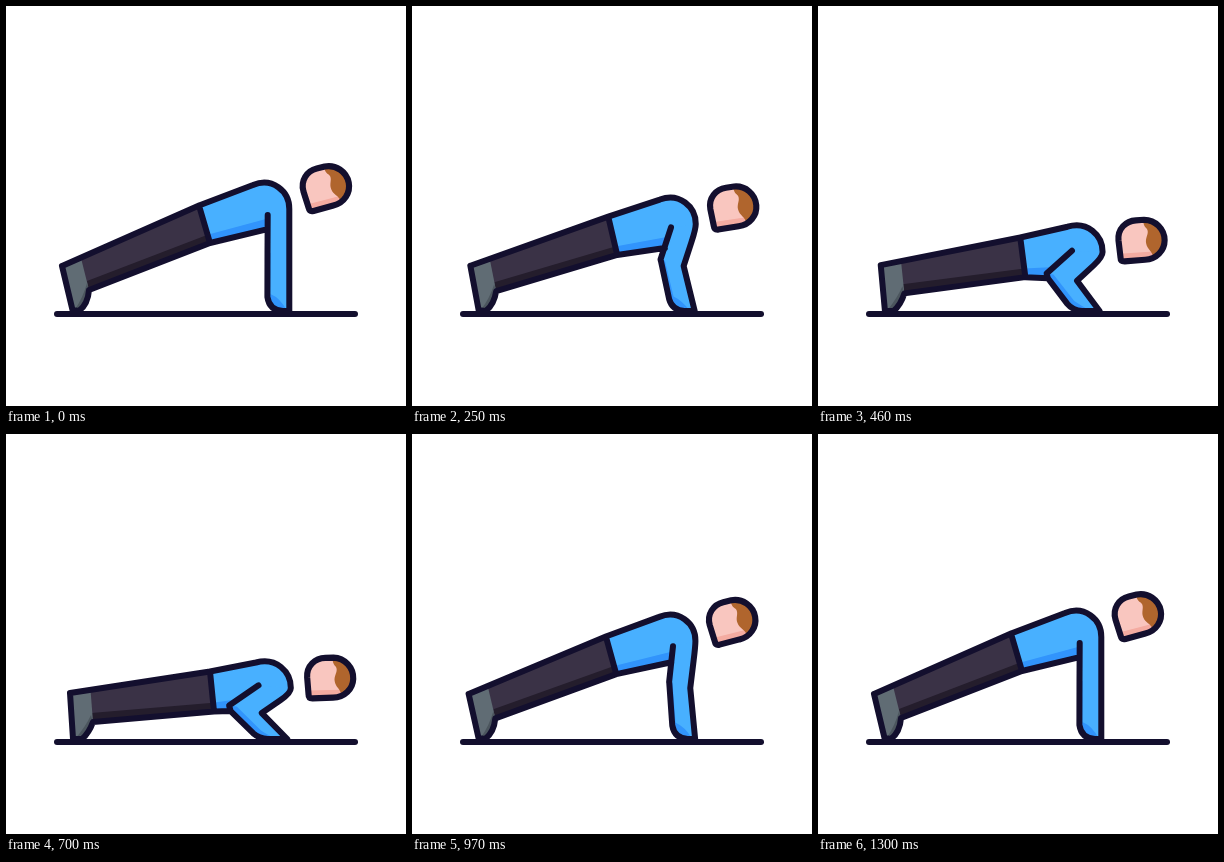
Animation, 400 px wide and 400 px high, one loop 1.36 s. Source, as an HTML page:

```html
<!DOCTYPE html>
<html lang="en">
<head>
<meta charset="utf-8">
<title>Push-up</title>
<style>
  html, body { margin: 0; width: 100%; height: 100%; overflow: hidden; background: #fff; }
  svg { display: block; width: 100vw; height: 100vh; }
  .line { fill: none; stroke: #130f2e; stroke-width: 6; stroke-linecap: round; stroke-linejoin: round; }
</style>
</head>
<body>
<svg viewBox="0 0 400 400">
  <path id="pants" fill="#3a3246"/>
  <path id="pantsShade" fill="#241d2c"/>
  <path id="shoe" fill="#606c74"/>
  <path id="shoeShade" fill="#4c565e"/>
  <path id="torso" fill="#48b0ff"/>
  <path id="torsoShade" fill="#3194fc"/>
  <path id="arm" fill="#48b0ff"/>
  <path id="armShade" fill="#3194fc"/>
  <path id="outline" class="line"/>
  <path class="line" d="M51 308H349"/>
  <g id="head">
    <path id="face" fill="#f9c6bf"/>
    <path fill="#f4aba1" d="M-21 13L12 11L13 17L4 19L-16 20.5L-20 19Z"/>
    <path fill="#b0652d" d="M2 -20C14 -20 23 -11 23 0C23 9 18 15 12 16.5C11 10 6 9 5 3C4 -2 7 -5 6.5 -9C6 -13 2.5 -11 2 -20Z"/>
    <path id="faceLine" class="line"/>
  </g>
</svg>
<script>
const LOOP = 1360, START = 100, STEP = 30;
const $ = id => document.getElementById(id);
const draw = (id, d) => $(id).setAttribute("d", d);

const skull = "M-20 17L-22 0C-23 -11 -15 -19 -5 -19.5L3 -20C14 -20 23 -11 23 0" +
  "C23 10 15 18.5 4 19L-16 20.5Q-20 20.5 -20 17Z";
draw("face", skull);
draw("faceLine", skull);

// Keys: time, body drop, head height, head tilt
const keys = [
  [100, 0, 181.2, -11],
  [250, 15, 201.2, -5],
  [460, 43, 234.3, 0],
  [640, 54, 246, 1.5],
  [700, 51, 244, 2],
  [820, 34, 232, 8],
  [970, 4, 187, -10.5],
  [1080, -3, 173.5, -14],
  [1180, -1.5, 177.5, -13],
  [1300, 0, 181.2, -11]
];

// Smooth curve through the keys, level at each turning point
function slope(i, c) {
  if (i === 0 || i === keys.length - 1) return 0;
  const [p, k, n] = [keys[i - 1], keys[i], keys[i + 1]];
  const a = (k[c] - p[c]) / (k[0] - p[0]);
  const b = (n[c] - k[c]) / (n[0] - k[0]);
  return a * b <= 0 ? 0 : 2 * a * b / (a + b);
}

function track(t, c) {
  const last = keys.length - 1;
  if (t <= keys[0][0]) return keys[0][c];
  if (t >= keys[last][0]) return keys[last][c];
  let i = 0;
  while (t > keys[i + 1][0]) i++;
  const a = keys[i], b = keys[i + 1], w = b[0] - a[0];
  const s = (t - a[0]) / w, r = 1 - s;
  return a[c] * (1 + 2 * s) * r * r + b[c] * s * s * (3 - 2 * s) +
    w * s * r * (r * slope(i, c) - s * slope(i + 1, c));
}

const mix = (a, b, u) => [a[0] + (b[0] - a[0]) * u, a[1] + (b[1] - a[1]) * u];
const add = (p, x, y) => [p[0] + x, p[1] + y];

// Joins command letters and points into path data
const path = (...parts) =>
  parts.map(p => typeof p === "string" ? p : p.map(v => v.toFixed(2)).join(" ")).join(" ");

function pose(d) {
  const u = d / 51, root = Math.sqrt(Math.max(0, d));
  const at = (ax, ay, bx, by) => mix([ax, ay], [bx, by], u);

  // Legs
  const hip = at(193, 199.5, 204, 237.5), waist = at(204, 237, 208, 277.5);
  const heel = at(56, 260, 64, 259), toe = at(66.5, 304, 67, 305);
  const sole = at(73, 305, 76, 305), ankle = at(83, 284, 87, 288);
  const bend = at(82, 298, 83, 299), cuff = at(75, 252, 84.5, 256);

  // Shoulder and arm
  const back = at(247, 179, 250, 228.5);
  const c1 = at(266, 171, 270, 223), c2 = at(283.5, 185, 285, 237.5);
  const side = 283.3 + .03 * d;
  const front = [side, 203 + d], corner = [side, 208 + d];
  const inner = [283.3 - .26 * d - 2 * root, 252 + .53 * d];
  const outer = [261.5 - .62 * d - .95 * root, 246 + .5 * d];
  const elbow = add(outer, .03 * d, .11 * d);
  const pit = [261.7 - .18 * d, 209 + .83 * d];
  const wrist = [261.4 - .28 * d, 291 + .16 * d];
  const palm = [277 - .3 * d, 305], hand = [283.3 - .04 * d, 305];
  const curl = [wrist[0] + 2 + .08 * d, 304.5];
  const under = mix(pit, elbow, Math.min(1, .38 + .0155 * d));

  const shoe = ["M", heel, "L", toe, "L", sole, "Q", bend, ankle];
  const shoulder = ["M", hip, "L", back, "C", c1, c2, front];
  const limb = ["Q", corner, upperEnd(corner, inner), "L", inner, "L", hand, "L", palm,
    "Q", curl, wrist, "L", elbow, "L", outer, "L", pit];

  draw("pants", path("M", heel, "L", hip, "L", waist, "L", ankle, "Z"));
  draw("pantsShade", path("M", ankle, "L", waist,
    "L", mix(waist, hip, .22), "L", add(ankle, -2, -9), "Z"));
  draw("shoe", path(...shoe, "L", cuff, "Z"));
  draw("shoeShade", path("M", ankle, "Q", bend, sole, "L", add(toe, 2, 0),
    "Q", add(sole, 4, -13), add(ankle, -2, -7), "Z"));
  draw("torso", path(...shoulder, "L", inner, "L", pit, "L", under, "L", waist, "Z"));
  draw("torsoShade", path("M", waist, "L", mix(waist, hip, .22),
    "L", add(under, 2, -11), "L", under, "Z"));
  draw("arm", path("M", pit, "L", front, ...limb, "Z"));

  const rim = 3 + .09 * Math.max(0, d);
  draw("armShade", path("M", outer, "L", elbow, "L", wrist, "Q", curl, palm,
    "L", add(palm, 4 + .1 * d, 0), "Q", add(wrist, 13, 1), add(wrist, rim, -3),
    "L", add(outer, rim, 1), "Z"));
  draw("outline", path(...shoulder, ...limb, "M", waist, "L", under,
    ...shoe, "L", waist, "L", hip, "L", heel));
}

// Where the rounded shoulder runs into the straight upper arm
function upperEnd(corner, inner) {
  return mix(corner, inner, .35);
}

function render(ms) {
  const t = ms % LOOP;
  const q = t < START ? START : START + STEP * Math.floor((t - START) / STEP + 1e-4);
  const drop = track(q, 1);
  pose(drop);
  $("head").setAttribute("transform",
    `translate(${319.6 + .08 * drop} ${track(q, 2)}) rotate(${track(q, 3)}) scale(1.025)`);
}

let origin;
function tick(now) {
  if (origin === undefined) origin = now;
  render(Math.max(0, now - origin));
  requestAnimationFrame(tick);
}
render(0);
requestAnimationFrame(tick);
</script>
</body>
</html>
```
